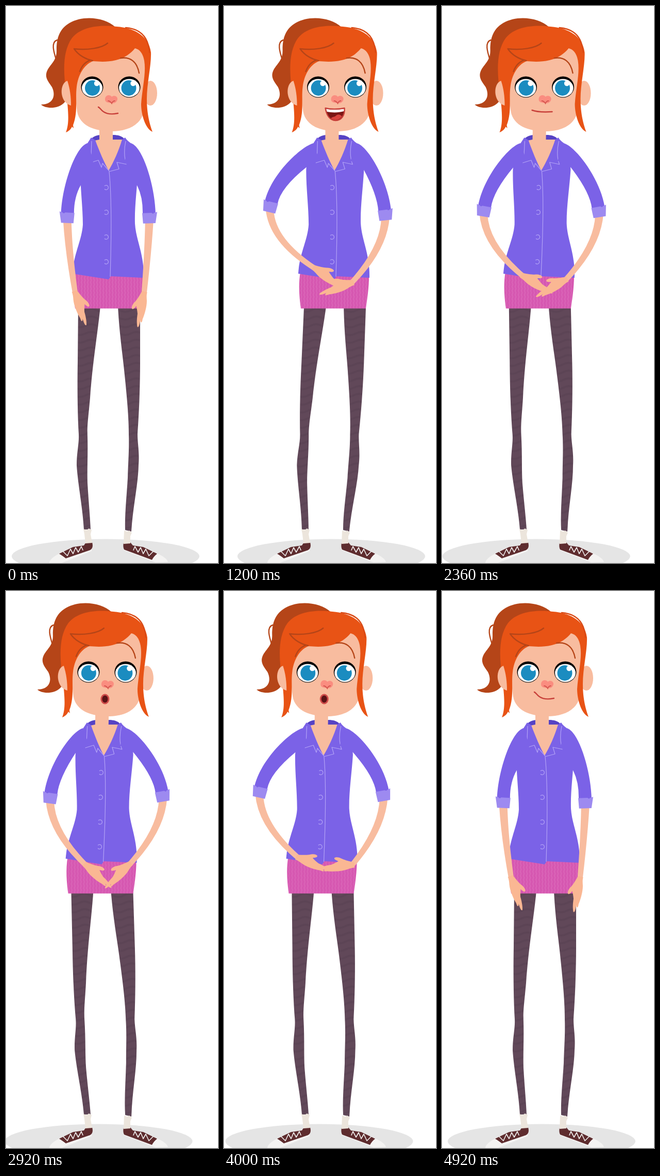
An HTML page for the animation above (6 s loop, 411 by 1080 pixels).

```html
<!DOCTYPE html>
<html lang="en">
<head>
<meta charset="utf-8">
<title>Talking girl</title>
<style>
html, body { margin: 0; width: 100%; height: 100%; overflow: hidden; background: #fff; }
svg { display: block; width: 100vw; height: 100vh; }
.skin { fill: #f8bc9f; }
.hand { fill: #fab793; }
.shirt { fill: #7b62e7; }
.cuff { fill: #9d8af0; }
.hair { fill: #e85315; }
.tail { fill: #b54518; }
.line { fill: none; stroke: #b54518; stroke-width: 2.4; stroke-linecap: round; stroke-linejoin: round; }
.seam { fill: none; stroke: #b3a3f6; stroke-width: 1.2; stroke-linejoin: round; }
.lip { fill: none; stroke: #c8403a; stroke-width: 2.4; stroke-linecap: round; stroke-linejoin: round; }
.sock { fill: #ece5dc; }
.shoe { fill: #5e2c2e; }
.toe { fill: #f4f3f2; }
.lace { fill: none; stroke: #f4f3f2; stroke-width: 1.6; stroke-linecap: round; stroke-linejoin: round; }
</style>
</head>
<body>
<svg viewBox="0 0 411 1080" preserveAspectRatio="none">
  <defs>
    <pattern id="knit" width="6" height="8" patternUnits="userSpaceOnUse">
      <rect width="6" height="8" fill="#d658b1"/>
      <path d="M2 0L3.4 4L2 8" fill="none" stroke="#df70be"/>
    </pattern>
    <pattern id="tights" width="44" height="15" patternUnits="userSpaceOnUse">
      <rect width="44" height="15" fill="#614859"/>
      <path d="M0 5Q11 11 22 5T44 5" fill="none" stroke="#5c4455" stroke-width="4"/>
    </pattern>
  </defs>

  <ellipse id="shadow" cx="193" cy="1067" rx="182" ry="33.5" fill="#e5e5e5"/>

  <path class="toe" d="M105 1061C92 1067 84 1074 84 1080H108L166 1057V1051Z"/>
  <path class="shoe" d="M103 1062L130 1049L151 1046L155 1040L167 1040C169 1047 168 1052 163 1055L116 1071C112 1068 108 1065 103 1062Z"/>
  <path class="lace" d="M111 1058L119 1066L125 1053L130 1062L135 1050L140 1059L146 1048L149 1055"/>
  <path class="toe" d="M292 1061C304 1066 312 1072 314 1078L290 1079L228 1055V1048Z"/>
  <path class="shoe" d="M228 1041L241 1040L246 1046L266 1049L293 1062C288 1066 285 1070 283 1074L229 1054C227 1050 227 1045 228 1041Z"/>
  <path class="lace" d="M285 1058L277 1066L271 1053L266 1062L261 1050L256 1059L250 1048L247 1055"/>

  <g id="legs" fill="url(#tights)">
    <path d="M140 582H183C177 640 168 690 163 760C160 795 157 812 158 835C159 870 157 900 158 925C160 960 163 990 164 1015H151C149 975 139 925 137 890C137 865 142 848 141 830C139 795 138 750 139 690Z"/>
    <path d="M217 582H260V690C260 750 257 800 255 830C255 850 259 865 257 890C256 930 246 970 243 1019L231 1016C230 985 234 950 236 915C237 880 239 860 238 830C238 800 235 765 231 725C227 680 220 640 217 582Z"/>
  </g>
  <path class="sock" d="M150 1014L156 1016L161 1013L166 1016L164 1024L167 1041L154 1042L152 1024ZM229 1017L235 1019L239 1017L244 1021L241 1028L241 1042L228 1043Z"/>

  <path id="skirt" fill="url(#knit)" d="M133 516H266C267 540 263 566 260 586.5H134C131 565 129 540 133 516Z"/>

  <g id="torso">
    <path d="M163 263C164 256 172 251 182 250H208C222 250 230 255 233 264L200 275Z" fill="#5643c4"/>
    <path class="skin" d="M181 236H207V259L227 259L200 323L171 261L181 259Z"/>
    <path class="shirt" d="M165 255L173 260C181 282 190 302 199 319C209 302 218 282 225 259L231 255C234 260 238 263 242 266L254 290L256 318C254 355 249 390 250 422C252 455 268 480 267 527L203 524L199 530L129 519C131 480 147 455 149 424C149 390 144 355 144 318L146 290L158 266Z"/>
    <path class="seam" d="M166 262C165 280 166 292 163 304L179 299L185 313L187 305L200 320M232 262C228 282 229 295 234 307L215 303L219 316L200 321C205 370 204 460 202 525"/>
    <g id="buttons"></g>
  </g>

  <g id="armL"></g>
  <g id="armR" transform="translate(400 0) scale(-1 1)"></g>

  <g id="head">
    <path class="tail" d="M212 41C192 22 150 17 123 33C104 44 98 62 98 84C99 104 89 110 81 123C73 138 82 146 89 157C97 173 92 191 68 191C76 199 98 200 110 190C121 182 125 165 130 140L180 60Z"/>
    <path class="line" d="M99 66C87 70 92 88 98 106"/>
    <ellipse class="skin" cx="280" cy="169" rx="13" ry="24"/>
    <path class="skin" d="M134 72H268C274 130 273 165 268 202C262 232 235 243 204 243C172 243 143 232 138 205C134 180 132 130 134 72Z"/>
    <path class="hair" d="M116 245C123 228 121 205 117 170C111 130 109 88 128 62C147 38 188 36 215 40C252 43 277 60 281 90C282 115 273 150 273 180C273 210 279 230 284 244C270 238 262 210 262 190C264 160 272 130 268 106C266 94 260 84 250 82C242 92 230 101 213 105C196 109 182 108 168 107C150 115 140 134 137 157C134 180 140 205 130 231L131 237L128 234C126 239 121 243 116 245Z"/>
    <path class="skin" d="M119 145C103 150 103 187 126 193C126 176 124 160 119 145Z"/>
    <path class="line" d="M132 83C157 86 186 82 197 72M132 83C140 95 154 103 168 106M143 127C147 116 154 108 164 105M222 101C241 98 254 108 258 130"/>
    <path class="line" d="M232 42C258 44 276 58 278 90" style="stroke:#d94a16"/>
    <g id="eyes"></g>
    <path fill="#fa8d80" d="M192 181C192 172 202 171 205 176C209 172 217 175 216 181C215 187 209 190 204 188C197 188 192 186 192 181Z"/>
    <path fill="none" stroke="#d6574f" stroke-width="1.8" stroke-linecap="round" d="M198 184C201 184 203 186 205 189C206 186 208 184 211 184"/>
    <path id="smile" class="lip" d="M179 196C182 197 184 202 189 205C198 211 208 210 217 208"/>
    <path id="flat" class="lip" d="M179 202C190 206 203 206 218 205"/>
    <g id="oh">
      <ellipse cx="199" cy="209.5" rx="8.5" ry="10" fill="#d04b49"/>
      <ellipse cx="199" cy="209.5" rx="5.5" ry="7" fill="#5a1316"/>
    </g>
    <g id="open">
      <path fill="#7b1715" d="M181 198C194 201 207 200 218 198C219 212 212 222 201 222C189 222 183 211 181 198Z"/>
      <path fill="#fff" d="M182 199C194 202 207 201 218 199L217 204C207 207 194 207 184 205Z"/>
      <path fill="#d8443e" d="M192 218C194 214 198 216 201 213C205 209 210 210 213 214C207 222 199 223 192 218Z"/>
      <path class="lip" d="M181 198C194 201 207 200 218 198C219 212 212 222 201 222C189 222 183 211 181 198Z"/>
    </g>
  </g>
</svg>
<script>
const $ = id => document.getElementById(id);
const LOOP = 6000, STEP = 40, END = 4920;
const rad = Math.PI / 180;
const mix = (a, b, u) => a + (b - a) * u;
const ease = u => { u = Math.min(1, Math.max(0, u)); return u * u * (3 - 2 * u); };

// Sway to the right until `turn`, then a quicker-out, slower-back lean to the left
function sway(t, turn, back) {
  if (t < turn) return 16 * Math.sin(Math.PI * t / turn);
  return -back * Math.sin(Math.PI * ((t - turn) / (END - turn)) ** .66);
}

// Joint angles in degrees: hanging at the side, then one per beat of the talk
const beats = [1200, 1840, 2920, 3560, 4480];
const left = {
  upper: [14, 36, 32.5, 25.5, 39, 31.5],
  fore: [6, 36, 34, 28, 37, 23],
  hand: [68, 32, 17, 38, 7, 33]
};
const right = {
  upper: [12.5, 21.5, 27, 29, 31, 29],
  fore: [4, 26.5, 26.5, 26, 31.5, 16],
  hand: [76, 16, 13, 41, 4, 2]
};

function joint([rest, ...talk], t) {
  let a = talk[0];
  for (let i = 1; i < beats.length; i++)
    a = mix(a, talk[i], ease((t - beats[i - 1]) / (beats[i] - beats[i - 1])));
  return mix(rest, a, ease(t / 640) * ease((END - t) / 480));
}

const CUFF = "M-15 -12L-9 -10L-7 -8L-4 -10L14 -9L12 11L-12 10Z";
const HAND = "M-5 -5C6 -8 12 -10 18 -13C24 -17 30 -18 33 -16C35 -13 30 -11 26 -9C30 -7 34 -5 40 -3C52 -2 62 1 65 3C66 6 58 6 51 5C58 8 54 10 48 9C36 11 20 11 10 8C4 6 0 5 -5 5Z";

function makeArm(id, pose) {
  $(id).innerHTML = `<path class="shirt"/><path class="skin"/><path class="hand" d="${HAND}"/><path class="cuff" d="${CUFF}"/>`;
  const [sleeve, fore, hand, cuff] = $(id).children;
  return { pose, sleeve, fore, hand, cuff };
}

function drawArm({ pose, sleeve, fore, hand, cuff }, t, shift) {
  const up = joint(pose.upper, t), low = joint(pose.fore, t), bend = joint(pose.hand, t);
  const cx = 150 + shift - 129 * Math.sin(up * rad), cy = 285 + 129 * Math.cos(up * rad);
  const wx = cx + 148 * Math.sin(low * rad), wy = cy + 148 * Math.cos(low * rad);
  const turn = (up - 14) * .48, c = Math.cos(turn * rad), s = Math.sin(turn * rad);
  const put = (x, y) => `${cx + x * c - y * s} ${cy + x * s + y * c}`;

  const x = shift + 158, pit = mix(350, 312, ease((up - 12) / 12));
  sleeve.setAttribute("d", `M${x} 266C${x - 23} 272 ${put(-10, -63)} ${put(-12, -8)}L${put(13, -8)}Q${put(13, -40)} ${x - 13} ${pit}L${x + 12} 300Z`);

  const ex = cx + 2, ey = cy + 66;
  const b = Math.atan2(wy - ey, wx - ex), nx = -Math.sin(b) * 5, ny = Math.cos(b) * 5;
  fore.setAttribute("d", `M${put(-8, 5)}Q${ex - 6} ${ey + 3} ${wx + nx} ${wy + ny}L${wx - nx} ${wy - ny}Q${ex + 7} ${ey - 4} ${put(8, 5)}Z`);
  hand.setAttribute("transform", `translate(${wx} ${wy}) rotate(${bend})`);
  cuff.setAttribute("transform", `translate(${cx} ${cy}) rotate(${turn})`);
}

// Syllables repeat in a short cycle, with a smiling pause between two phrases
const word = ["flat", "oh", "flat", "open", "oh"];
function mouthAt(t) {
  if (t < 200 || t >= 4600 || (t >= 1600 && t < 2000)) return "smile";
  return t >= 4440 ? "flat" : word[Math.floor(t / 150) % word.length];
}

// Shear that moves row y0 by d0 and row y1 by d1
function shear(y0, d0, y1, d1) {
  const k = (d1 - d0) / (y1 - y0);
  return `matrix(1 0 ${k} 1 ${d0 - k * y0} 0)`;
}
const place = (id, transform) => $(id).setAttribute("transform", transform);

const eye = (x, look) => `<ellipse cx="${x}" cy="157" rx="21.5" ry="20.5"/>
  <ellipse cx="${x}" cy="159" rx="20" ry="17.5" fill="#fff"/>
  <ellipse cx="${x + look}" cy="159" rx="14.5" ry="15" fill="#1b8cc0"/>
  <circle cx="${x + look + 8.5}" cy="150" r="5.2" fill="#fff"/>`;
$("eyes").innerHTML = eye(167, .5) + eye(239, -1);
$("buttons").innerHTML = [0, 1, 2, 3].map(i =>
  `<path class="seam" d="M191 ${349 + 48 * i}a4.3 4.3 0 1 1 0 6"/>`).join("");

const armL = makeArm("armL", left), armR = makeArm("armR", right);

function draw(ms) {
  const t = Math.min(END, Math.floor(ms / STEP) * STEP);
  const hip = sway(t, 1950, 13.5), neck = sway(t, 2050, 8.2), head = sway(t, 2090, 7.2);
  const shoulder = mix(neck, hip, .13);
  place("shadow", `translate(${hip})`);
  place("skirt", `translate(${hip})`);
  place("legs", shear(586, hip, 1014, 0));
  place("torso", shear(255, neck, 525, hip));
  place("head", `translate(${head})`);
  drawArm(armL, t, shoulder);
  drawArm(armR, t, -shoulder);
  const mouth = mouthAt(t);
  for (const m of ["smile", "flat", "oh", "open"]) $(m).style.display = m === mouth ? "" : "none";
}

function tick() {
  draw(performance.now() % LOOP);
  requestAnimationFrame(tick);
}
tick();
</script>
</body>
</html>
```
